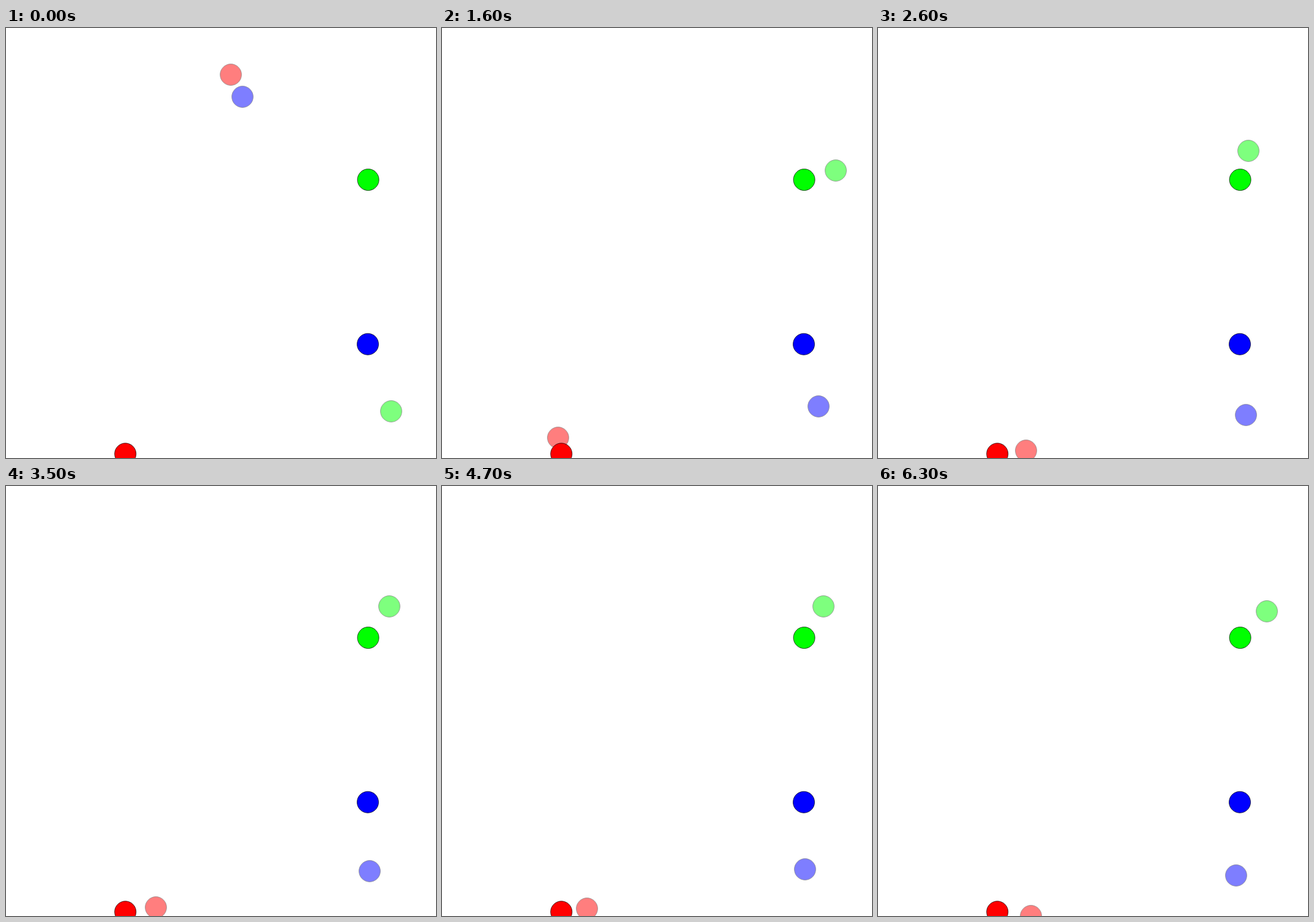
These frames come from a looping animation (700 by 700 pixels, 6.4 s). An HTML page:

```html
<!DOCTYPE html>
<html>
<head>
<meta charset="utf-8">
<style>
html, body { margin: 0; width: 100%; height: 100%; overflow: hidden; background: #fff; }
svg { display: block; width: 100vw; height: 100vh; }
circle { stroke: #000; stroke-opacity: .7; stroke-width: 1; }
.guess { opacity: .5; }
</style>
</head>
<body>
<svg viewBox="0 0 700 700">
  <circle class="guess" r="17.4" fill="#f00"/>
  <circle class="guess" r="17.4" fill="#0f0"/>
  <circle class="guess" r="17.4" fill="#00f"/>
  <circle cx="194.3" cy="693.3" r="17.5" fill="#f00"/>
  <circle cx="589.6" cy="247" r="17.5" fill="#0f0"/>
  <circle cx="589" cy="514.7" r="17.5" fill="#00f"/>
</svg>
<script>
const STEP = 100, STEPS = 64, WOBBLE = 6;

// Steps at which the key points below are reached: a long approach, then drift
const keys = [0, 8, 16, 26, 35, 47, 63];
const guesses = [
  { x: [366, 87, 189, 241, 244, 236, 249], y: [76, 494, 667, 688, 686, 688, 700] },
  { x: [627, 566, 641, 603, 624, 621, 633], y: [624, 246, 232, 200, 196, 196, 204] },
  { x: [385, 560, 613, 599, 592, 591, 583], y: [112, 463, 616, 630, 627, 624, 634] }
];

const dots = document.querySelectorAll('.guess');

function slope(v, i) {
  const a = Math.max(i - 1, 0), b = Math.min(i + 1, keys.length - 1);
  return (v[b] - v[a]) / (keys[b] - keys[a]);
}

// Cubic Hermite curve through the key values
function glide(v, i, u) {
  const h = keys[i + 1] - keys[i], w = 1 - u;
  return w * w * (1 + 2 * u) * v[i] + u * u * (3 - 2 * u) * v[i + 1]
    + h * u * w * (w * slope(v, i) - u * slope(v, i + 1));
}

function draw(ms) {
  const s = Math.floor(ms / STEP) % STEPS;
  let i = 0;
  while (i < keys.length - 2 && s >= keys[i + 1]) i++;
  const u = (s - keys[i]) / (keys[i + 1] - keys[i]);
  const sway = i > 1 ? WOBBLE * Math.sin(3 * Math.PI * u) : 0;

  guesses.forEach((g, n) => {
    dots[n].setAttribute('cx', glide(g.x, i, u) + sway);
    dots[n].setAttribute('cy', glide(g.y, i, u));
  });
}

const start = performance.now();
function tick() {
  draw(performance.now() - start);
  requestAnimationFrame(tick);
}
tick();
</script>
</body>
</html>
```
